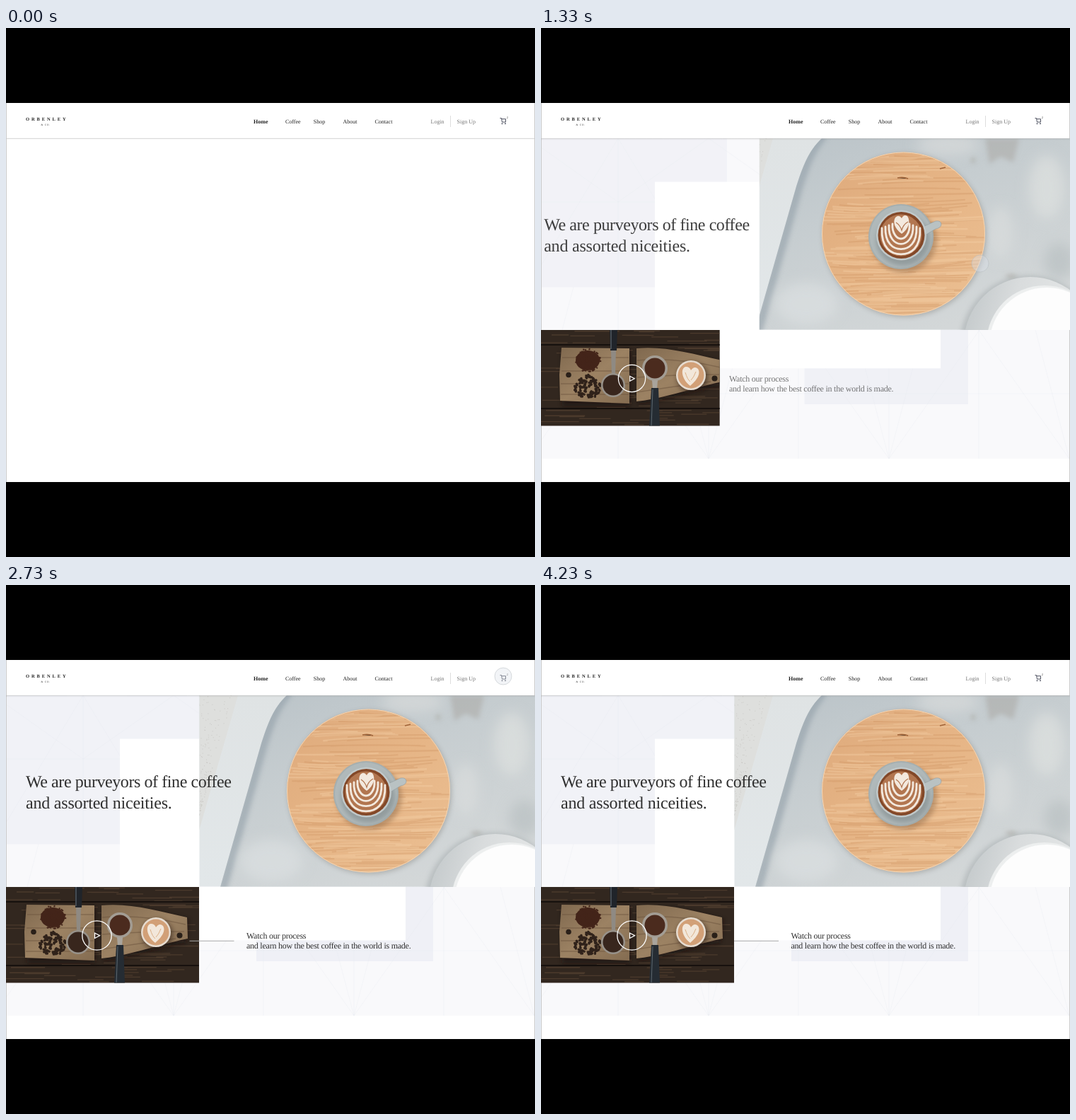
These frames come from a looping animation (748x748 px, 4600 ms). An HTML page:

```html
<!DOCTYPE html>
<html lang="en">
<head>
<meta charset="utf-8">
<title>Coffee shop landing page</title>
<style>
  html, body { margin: 0; width: 100%; height: 100%; overflow: hidden; background: #000; }
  svg { display: block; width: 100%; height: 100%; }
  text { font-family: "Liberation Serif", "Noto Serif", serif; text-rendering: geometricPrecision; }
  .nav { font-size: 8px; fill: #222; }
  .soft { fill: #777; }
  .bold { font-weight: bold; }
</style>
</head>
<body>
<svg viewBox="0 0 748 748">
  <defs>
    <clipPath id="heroClip"><rect id="heroEdge" y="156" height="270.5"/></clipPath>
    <clipPath id="brewClip"><rect id="brewEdge" y="427" height="135.5"/></clipPath>
    <clipPath id="cartClip"><rect id="cartEdge" x="495" y="156" width="253"/></clipPath>
    <clipPath id="pageClip"><rect y="106" width="748" height="536"/></clipPath>
    <clipPath id="tableClip"><circle cx="512.5" cy="291" r="115.5"/></clipPath>
    <clipPath id="floorClip"><path d="M397 156C378 174 370 196 361 224L303 427H748V156Z"/></clipPath>
    <linearGradient id="floor" x1="0" y1="0" x2=".6" y2="1">
      <stop offset="0" stop-color="#b9c2c7"/><stop offset=".45" stop-color="#c6cdd0"/>
      <stop offset="1" stop-color="#d3d7d8"/>
    </linearGradient>
    <linearGradient id="ledge" x1="0" y1="0" x2="0" y2="1">
      <stop offset="0" stop-color="#dfe3e4"/><stop offset="1" stop-color="#e2e7e9"/>
    </linearGradient>
    <linearGradient id="wood" x1="0" y1="0" x2="1" y2="1">
      <stop offset="0" stop-color="#deaa7c"/><stop offset=".5" stop-color="#e6b586"/>
      <stop offset="1" stop-color="#ecc093"/>
    </linearGradient>
    <linearGradient id="pot" x1="0" y1="0" x2="1" y2=".3">
      <stop offset="0" stop-color="#bfc5c7"/><stop offset=".4" stop-color="#d9dcdd"/>
      <stop offset="1" stop-color="#e9ebeb"/>
    </linearGradient>
    <linearGradient id="board" x1="0" y1="0" x2="1" y2="1">
      <stop offset="0" stop-color="#80694f"/><stop offset=".5" stop-color="#9c8263"/>
      <stop offset="1" stop-color="#846c51"/>
    </linearGradient>
    <linearGradient id="shade" x1="0" y1="0" x2="0" y2="1">
      <stop offset="0" stop-color="#000" stop-opacity=".07"/><stop offset="1" stop-color="#000" stop-opacity="0"/>
    </linearGradient>
    <filter id="blur" x="-30%" y="-30%" width="160%" height="160%"><feGaussianBlur stdDeviation="3"/></filter>
    <filter id="haze" x="-30%" y="-30%" width="160%" height="160%"><feGaussianBlur stdDeviation="9"/></filter>
  </defs>

  <rect width="748" height="748"/>
  <g clip-path="url(#pageClip)">
    <rect y="106" width="748" height="536" fill="#fff"/>
    <g id="backdrop">
      <rect y="156" width="748" height="453" fill="#f9f9fb"/>
      <rect id="leftPanel" y="156" height="210.5" fill="#f1f2f7"/>
      <rect id="rightPanel" y="400" height="132" fill="#eff0f6"/>
      <path id="rays" fill="none" stroke="#dfe3ea" stroke-width=".7" opacity=".38"/>
    </g>
    <rect id="whiteBox" x="161" y="217.5" width="404" fill="#fff"/>
    <path d="M.5 106V642M747.5 106V642" stroke="#ccc"/>

    <g clip-path="url(#heroClip)">
      <rect x="273" y="156" width="475" height="271" fill="url(#ledge)"/>
      <path d="M273 156H328L273 347Z" fill="#dedfdd"/>
      <path id="grit" stroke="#b5b3ae" stroke-width=".8" opacity=".6"/>
      <g clip-path="url(#floorClip)">
        <rect x="273" y="156" width="475" height="271" fill="url(#floor)"/>
        <path d="M399 152C380 174 373 196 364 224L306 430" fill="none" stroke="#929fa8" stroke-width="13" opacity=".6" filter="url(#blur)"/>
        <g filter="url(#haze)">
          <ellipse cx="375" cy="390" rx="45" ry="30" fill="#dce0e1" opacity=".7"/>
          <ellipse cx="575" cy="165" rx="45" ry="16" fill="#d9dcdc" opacity=".7"/>
          <ellipse cx="715" cy="225" rx="25" ry="45" fill="#dfe1e0" opacity=".7"/>
          <ellipse cx="650" cy="290" rx="18" ry="38" fill="#dadddd" opacity=".7"/>
          <ellipse cx="733" cy="330" rx="22" ry="26" fill="#b4bcbf" opacity=".6"/>
        </g>
        <g filter="url(#blur)" fill="#a5a39b">
          <path d="M628 156H676L668 190L650 182L634 192Z" opacity=".45"/>
          <ellipse cx="665" cy="351" rx="8" ry="2.5" opacity=".7"/>
          <ellipse cx="611" cy="187" rx="3" ry="4" opacity=".6"/>
        </g>
      </g>
      <ellipse cx="690" cy="449" rx="98" ry="99" fill="#9ba3a5" opacity=".45" filter="url(#blur)"/>
      <circle cx="692" cy="446" r="94" fill="url(#pot)"/>
      <circle cx="712" cy="446" r="82" fill="#edefef"/>
      <circle cx="715" cy="448" r="81" fill="#fdfdfd"/>
      <circle cx="514" cy="293" r="116" fill="#7e7e7a" opacity=".4" filter="url(#blur)"/>
      <circle cx="512.5" cy="291" r="115.5" fill="url(#wood)"/>
      <g clip-path="url(#tableClip)" fill="none">
        <path id="darkGrain" stroke="#c38856" stroke-width="2" opacity=".26"/>
        <path id="lightGrain" stroke="#f5d3ab" stroke-width="2.4" opacity=".32"/>
      </g>
      <path d="M504 212q8 -2 15 1M564 199l8 -2" stroke="#a2653a" stroke-width="1.6"/>
      <circle cx="512.5" cy="291" r="115" fill="none" stroke="#f4d5b4"/>
      <ellipse cx="513" cy="300" rx="47" ry="46" fill="#805c3e" opacity=".4" filter="url(#blur)"/>
      <circle cx="509" cy="295" r="46" fill="#a5afb0"/>
      <circle cx="509" cy="295" r="44" fill="#b0b9ba"/>
      <ellipse cx="512" cy="300" rx="38" ry="36" fill="#858f91" opacity=".7" filter="url(#blur)"/>
      <path d="M538 282L558 273Q566 272 566 278Q565 283 558 284L543 293Z" fill="#b9c2c3" stroke="#939da0" stroke-width=".6"/>
      <circle cx="509.5" cy="293" r="35.5" fill="#c1c9ca"/>
      <circle cx="509.5" cy="293" r="33" fill="#834828"/>
      <circle cx="509" cy="293" r="29.500" fill="#b27650"/>
      <g id="latte" fill="none" stroke="#f3e9de" stroke-width="2.800" stroke-linecap="round"/>
      <path d="M510 291C500 284 497 274 501 268Q506 263 510 269Q513 263 518 266C523 273 520 284 510 291Z" fill="#f3e9de"/>
      <path d="M502 275Q508 279 510 286Q512 278 519 274" fill="none" stroke="#b27650" stroke-width="1.200"/>
    </g>

    <g id="heading" fill="#2f2f2f" font-size="24">
      <text x="28" y="285.5" letter-spacing="-.42">We are purveyors of fine coffee</text>
      <text x="28" y="315.5" letter-spacing="-.2">and assorted niceities.</text>
    </g>

    <g clip-path="url(#brewClip)">
      <rect y="427" width="273" height="136" fill="#32271f"/>
      <path id="planks" fill="none" stroke="#654e3b" stroke-width="1.300" opacity=".5"/>
      <path d="M0 448H273M0 538H273" stroke="#17110e" stroke-width="2"/>
      <path d="M30 456L126 455V534H30Z M137 456C180 452 220 463 258 473L254 506C220 510 175 528 137 531Z" fill="#120d0a" opacity=".6" filter="url(#blur)"/>
      <path d="M29 452L125 453V531L27 527L26 490Z" fill="url(#board)"/>
      <path d="M135 453C175 449 215 461 256 470L257 500C220 507 175 524 135 528Z" fill="url(#board)"/>
      <path d="M30 466H124M29 485H125M28 503H124M28 518H124M136 470Q190 465 254 480M136 494Q190 490 252 490M136 515Q180 508 240 500" fill="none" stroke="#6a533c" stroke-width="1.500" opacity=".5"/>
      <circle cx="39" cy="490.500" r="3.800" fill="#2a2019"/>
      <circle cx="245.500" cy="495.500" r="4" fill="#2a2019"/>
      <ellipse cx="66" cy="470" rx="17" ry="14" fill="#432419"/>
      <path id="grounds" stroke="#432419" stroke-width="2.200" stroke-linecap="round"/>
      <path id="beans" stroke="#30221a" stroke-width="3.400" stroke-linecap="round"/>
      <path d="M97 427H108L107 456H98Z" fill="#20242a"/>
      <path d="M99 427V454" stroke="#68727b"/>
      <path d="M99 456H106L105 491H100Z" fill="#8f8a83"/>
      <circle cx="102" cy="505" r="17" fill="#98928a"/>
      <circle cx="102" cy="505" r="14.500" fill="#38261d"/>
      <circle cx="161" cy="481" r="18" fill="#a39d94"/>
      <circle cx="161" cy="481" r="14.500" fill="#4b2b1e"/>
      <path d="M157 498H165L164 511H158Z" fill="#a9a49c"/>
      <path d="M156 509H166L168 563H153Z" fill="#252c33"/>
      <path d="M158 511L156 563" stroke="#5d6870"/>
      <circle cx="214" cy="494" r="22" fill="#2a1d13" opacity=".55" filter="url(#blur)"/>
      <circle cx="212" cy="491" r="21" fill="#e6dcd0"/>
      <circle cx="212" cy="491" r="18.500" fill="#d2a077"/>
      <path d="M211 506C198 496 197 480 205 479Q210 479 212 484Q217 477 222 482C227 490 218 500 211 506Z" fill="#f2e7da"/>
      <path d="M204 487q3 10 7 13M219 486q-3 8 -7 12" fill="none" stroke="#dcb087"/>
    </g>
    <g id="play" fill="none" stroke="#fff" stroke-width="1.300">
      <circle r="20.700"/><path d="M-3 -3.500L4 .2L-3 4Z"/>
    </g>

    <path id="rule" d="M0 503.300H63" stroke="#aaa"/>
    <g id="caption" fill="#2f2f2f" font-size="12" letter-spacing="-.24">
      <text x=".5" y="499.500">Watch our process</text>
      <text x=".5" y="514">and learn how the best coffee in the world is made.</text>
    </g>

    <g clip-path="url(#cartClip)">
      <rect x="495" y="156" width="253" height="280" fill="#fff"/>
      <text class="nav soft" x="514" y="180">Your Cart</text>
      <path d="M513 190H732M513 282.500H732M513 376H732" stroke="#e4e4e4"/>
      <g id="items"></g>
      <path d="M531 217H564L562 224L565 257Q548 260 531 257L533 224Z" fill="#262626"/>
      <path d="M534 219H562" stroke="#555" stroke-width="1.500"/>
      <text class="bold" x="547.500" y="241" font-size="4.500" fill="#fff" text-anchor="middle">WOBREN</text>
      <path d="M536 309H556L558 349Q546 352 534 349Z" fill="#46525b"/>
      <path d="M535 320L545 315L557 322L556 327L544 323ZM535 340L546 335L557 339V347L545 343L535 348Z" fill="#c9704b"/>
      <path d="M538 313l6 2M549 311l5 5M537 337l5 -3M548 350l7 -4" stroke="#a9c2cb" stroke-width="1.500"/>
      <rect x="539" y="324" width="14" height="10" fill="#f7f5f1"/>
      <text x="546" y="330.500" font-size="3" text-anchor="middle">ORLWEN</text>
      <rect x="513" y="389" width="137" height="24" fill="#525b6d"/>
      <text class="bold" x="581.500" y="404.500" font-size="9" fill="#fff" text-anchor="middle">Continue to Checkout</text>
      <text class="nav" x="662" y="404.500">Total:</text>
      <text x="694" y="404" font-size="11">$27.26</text>
    </g>

    <rect y="106" width="748" height="50" fill="#fff"/>
    <path d="M.5 106V156M747.500 106V156" stroke="#ccc"/>
    <path id="headerLine" d="M0 156.300H748" stroke="#ccc" stroke-width=".9"/>
    <rect id="headerShade" y="156" width="748" height="3" fill="url(#shade)"/>
    <text class="bold" x="28" y="130.500" font-size="6.500" letter-spacing="2.900" fill="#222">ORBENLEY</text>
    <text x="49.500" y="137.500" font-size="3.700" letter-spacing=".7" fill="#333">&amp; CO.</text>
    <g id="menu"></g>
    <path d="M628.500 124V140" stroke="#ddd"/>
    <g fill="none" stroke="#3a3f50" stroke-width=".9">
      <path d="M698.500 127.500H700.500L701.500 133H706.500V128.700H701"/>
      <circle cx="701.500" cy="135.200" r=".6"/><circle cx="706" cy="135.200" r=".6"/>
    </g>
    <text x="707.700" y="127.500" font-size="4.500" fill="#444">2</text>
    <circle id="cursor" fill="#dde3ea" fill-opacity=".4" stroke="#b4b9be" stroke-opacity=".7" stroke-width=".7"/>
  </g>
</svg>
<script>
const LOOP = 4600;
const $ = id => document.getElementById(id);
const set = (id, attrs) => { for (const k in attrs) $(id).setAttribute(k, attrs[k]); };
const clamp = v => Math.min(1, Math.max(0, v));
const ramp = (t, start, length) => clamp((t - start) / length);
const easeOut = (t, start, length, power = 3) => 1 - (1 - ramp(t, start, length)) ** power;
const mix = (a, b, k) => a + (b - a) * k;

let seed = 7;
const random = () => (seed = seed * 16807 % 2147483647) / 2147483647;
const repeat = (n, make) => Array.from({ length: n }, (_, i) => make(i)).join("");

function drawTextures() {
  set("rays", { d: repeat(4, i => {
    const x = -18 + 255 * i;
    return [-128, -64, 0, 64, 128].map(dx => `M${x} 609L${x + dx} ${dx % 128 ? 366 : 427}`).join("") +
      `M${x + 127} 156V609M${x} 366L${x + 127} 156L${x + 255} 366M${x} 156L${x + 127} 246L${x + 255} 156`;
  }) + "M0 246H748M0 517H748" });
  set("grit", { d: repeat(150, () => {
    const y = 156 + random() * 170;
    return `M${273 + random() * (325 - y) * .29} ${y}h1`;
  }) });
  const grain = n => repeat(n, () => {
    const y = 178 + random() * 228, bend = 5 * Math.sin(y * .08), x = 390 + random() * 110;
    return `M${x} ${y}q${40 + random() * 30} ${bend} ${90 + random() * 100} ${-random() * 5}`;
  });
  set("darkGrain", { d: grain(85) });
  set("lightGrain", { d: grain(65) });
  set("planks", { d: repeat(95, () => `M${random() * 250 - 10} ${428 + random() * 134}h${15 + random() * 50}`) });
  const pile = (n, cy, len) => repeat(n, () => {
    const a = random() * 6.283, r = 18 * Math.sqrt(random());
    return `M${66 + r * Math.cos(a)} ${cy + r * .9 * Math.sin(a)}l${len * Math.cos(a * 5)} ${len * Math.sin(a * 5)}`;
  });
  set("grounds", { d: pile(110, 470, .5) });
  set("beans", { d: pile(85, 508, 1.5) });
  $("latte").innerHTML = repeat(4, i => {
    const w = 12 + 5 * i, bottom = 298 + 7.3 * i, top = 277 + 2 * i;
    return `<path d="M${509 - w} ${top}C${508 - w} ${bottom - 8} ${509 - w * .5} ${bottom} 509 ${bottom}S${510 + w} ${bottom - 8} ${509 + w} ${top}"/>`;
  });
}

function drawLabels() {
  const menu = [["Home", 350, "bold"], ["Coffee", 395, ""], ["Shop", 434.7, ""], ["About", 476.5, ""],
    ["Contact", 521.5, ""], ["Login", 600.5, "soft"], ["Sign Up", 637.5, "soft"]];
  $("menu").innerHTML = menu.map(([label, x, style]) =>
    `<text class="nav ${style}" x="${x}" y="134.5">${label}</text>`).join("");

  const items = [["Wobren Coffee", "Dark Roast Beans", "$12.60"], ["Orlwen’s Roasting", "Caramel Superior", "$14.66"]];
  $("items").innerHTML = items.map(([name, kind, price], i) => `
    <g transform="translate(0 ${i * 92.7})">
      <rect x="512.5" y="203.3" width="67" height="67" fill="#f2f2f2"/>
      <path d="M722 208l4 4m0 -4l-4 4" stroke="#777" stroke-width=".7"/>
      <text class="nav bold" x="592" y="234">${name}</text>
      <text x="592" y="245" font-size="6.8" fill="#333">${kind}</text>
      <path d="M592 256h15v14h-15zM626.5 256h15v14h-15z" fill="#eee"/>
      <path d="M596.5 263h6M631 263h6m-3 -3v6" stroke="#555" stroke-width=".8"/>
      <text x="615.5" y="265" font-size="5" fill="#555">1</text>
      <text x="732" y="265.7" font-size="7.5" fill="#222" text-anchor="end">${price}</text>
    </g>`).join("");
}

function cursorPosition(t) {
  if (t < 1675) return [621, mix(121, 333, easeOut(t, 0, 1200))];
  const k = easeOut(t, 1675, 720);
  return [mix(621, 703, k), mix(333, 129, k) + ramp(t, 2900, 400) * 2];
}

function render(t) {
  const p = easeOut(t, 50, 1893, 2.3);
  set("backdrop", { opacity: p });
  set("leftPanel", { width: 284 * p });
  set("rightPanel", { x: 604 - 250 * p, width: 250 * p });
  set("whiteBox", { height: 285 * p });
  set("heroEdge", { x: 748 - 474.5 * p, width: 474.5 * p });
  set("brewEdge", { width: 273 * p });
  set("heading", { transform: `translate(${-320 * (1 - p)} 0)`, opacity: p });
  set("play", { transform: `translate(128.5 495.5) scale(${p})`, opacity: clamp(p * 2) });
  set("headerShade", { opacity: p });
  set("headerLine", { opacity: 1 - p * .4 });

  const captionX = 353 - 262 * (1 - ramp(t, 0, 4350)) ** 3;
  set("caption", { transform: `translate(${captionX} 0)`, opacity: ramp(t, 0, 2050) });
  set("rule", { transform: `translate(${captionX - 80} 0)`, opacity: ramp(t, 1450, 900) });

  const open = easeOut(t, 3200, 400) * (1 - ramp(t, 3790, 400) ** 2);
  set("cartEdge", { height: 278 * open });

  const [cx, cy] = cursorPosition(t);
  const press = ramp(t, 3150, 150);
  set("cursor", {
    cx, cy, r: 12 + press,
    opacity: ramp(t, 30, 350) * (1 - ramp(t, 3850, 330)),
    "fill-opacity": mix(.38, .75, press)
  });
}

drawTextures();
drawLabels();
const start = performance.now();
function tick() {
  render((performance.now() - start) % LOOP);
  requestAnimationFrame(tick);
}
render(0);
requestAnimationFrame(tick);
</script>
</body>
</html>
```
